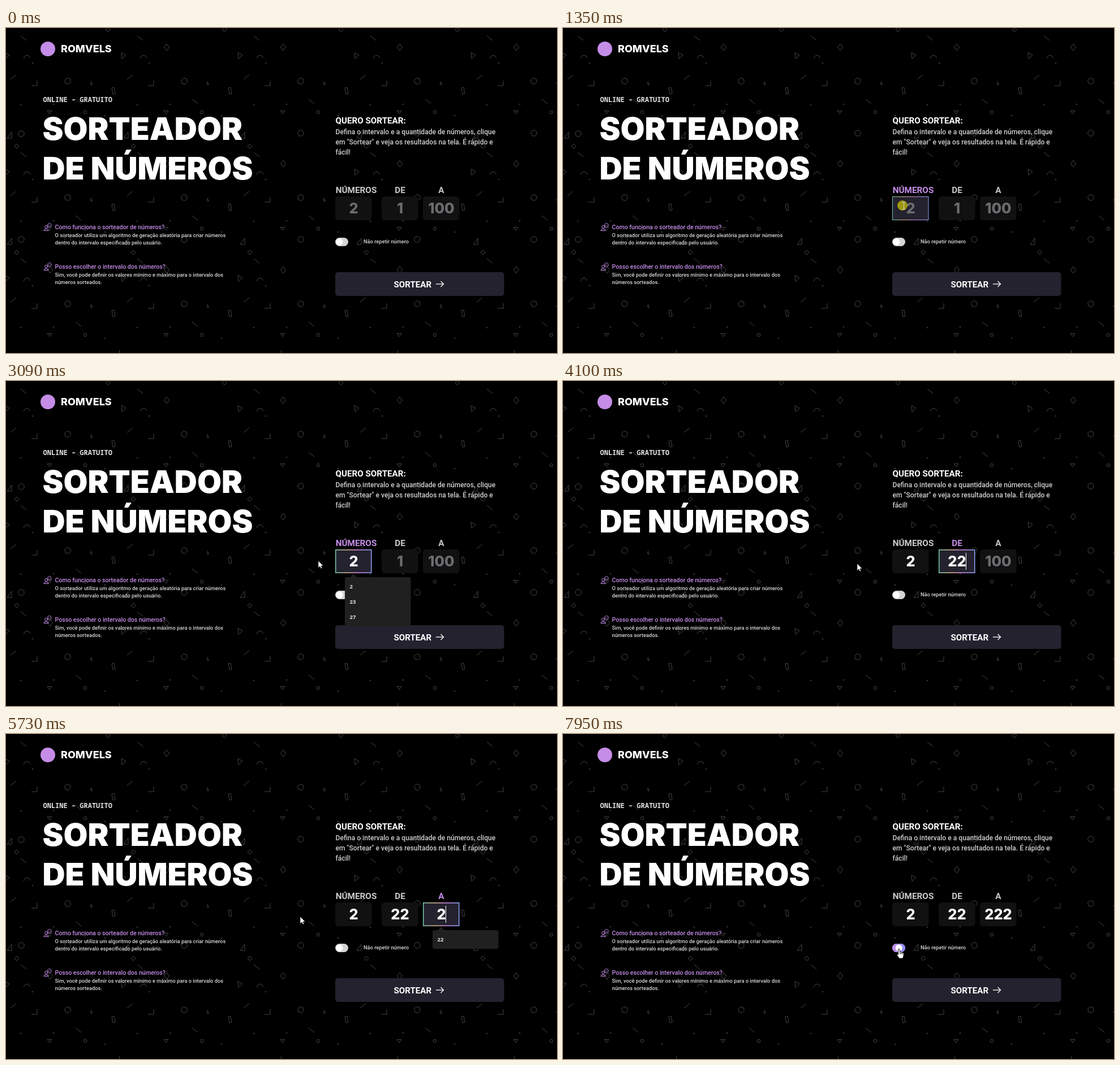
An HTML page with a canvas for the animation above (7.99 s loop, 974 by 575 pixels).

```html
<!DOCTYPE html>
<html lang="pt-BR">
<head>
<meta charset="utf-8">
<title>Sorteador de números</title>
<style>
  html, body { margin: 0; width: 100%; height: 100%; overflow: hidden; background: #000; }
  canvas { display: block; }
</style>
</head>
<body>
<canvas id="stage" width="974" height="575"></canvas>
<script>
const W = 974, H = 575, LOOP = 7990;
const ctx = document.getElementById('stage').getContext('2d');
const PURPLE = '#c58de7', PANEL = '#24222e', LIGHT = '#d0d0d2';
const ROBOTO = 'Roboto, sans-serif', INTER = 'Inter, sans-serif';

const clamp = v => Math.max(0, Math.min(1, v));
const easeOut = p => 1 - (1 - p) ** 2;
const easeInOut = p => p * p * (3 - 2 * p);

function text(c, str, x, y, font, color, align = 'left') {
  c.font = font;
  c.fillStyle = color;
  c.textAlign = align;
  c.fillText(str, x, y);
}

function box(c, x, y, w, h, r, fill) {
  c.beginPath();
  c.roundRect(x, y, w, h, r);
  c.fillStyle = fill;
  c.fill();
}

function disc(c, x, y, r, fill) {
  c.beginPath();
  c.arc(x, y, r, 0, Math.PI * 2);
  c.fillStyle = fill;
  c.fill();
}

function poly(c, points, closed = true) {
  c.beginPath();
  points.forEach(([x, y]) => c.lineTo(x, y));
  if (closed) c.closePath();
}

// ---- Confetti pattern ----
const SHAPES = {
  gem: c => poly(c, [[0, -4], [4, 0], [0, 4], [-4, 0]]),
  diamond: c => poly(c, [[0, -6], [4.5, 0], [0, 6], [-4.5, 0]]),
  play: c => poly(c, [[-3, -5.5], [5, -1], [-2, 5.5]]),
  wedge: c => poly(c, [[4, -6], [4, 5], [-4, 5]]),
  arc: c => { c.beginPath(); c.arc(0, 4, 5.5, Math.PI, Math.PI * 1.95); },
  slash: c => poly(c, [[-5, 4], [5, -4]], false),
  backslash: c => poly(c, [[-5, -4], [5, 4]], false),
  corner: c => poly(c, [[4, -5], [4, 4], [-6, 4]], false),
  bolt: c => poly(c, [[0, -4], [-2, 1], [1.5, 0], [-0.5, 4]], false),
  bar: c => poly(c, [[-3, -5], [1, -6], [3, 5], [-1, 6]]),
  hexagon: c => poly(c, [...Array(6)].map((_, i) =>
    [5.6 * Math.cos(i * Math.PI / 3 + 0.3), 5.6 * Math.sin(i * Math.PI / 3 + 0.3)])),
  tri: c => poly(c, [[-4, -2.5], [4, -2.5], [0, 3]]),
  ring: c => { c.beginPath(); c.arc(0, 0, 5.2, 0, 7); },
  ringlet: c => { c.beginPath(); c.arc(0, 0, 2.8, 0, 7); },
  dot: c => { c.beginPath(); c.arc(0, 0, 0.9, 0, 7); }
};
const TILE = [
  ['diamond', 78, 240], ['play', 1, 255], ['arc', 37, 256], ['backslash', 31, 224],
  ['dot', 47, 268], ['slash', 13, 293], ['hexagon', 109, 300], ['corner', 51, 304],
  ['bolt', 151, 304], ['bar', 190, 317], ['backslash', 128, 336], ['dot', 26, 342],
  ['dot', 84, 341], ['tri', 77, 355], ['ringlet', 140, 355], ['dot', 175, 361]
];
const LOW_ROW = [['ring', 109, 374], ['wedge', 6, 378]];

function stamp(c, name, x, y) {
  c.save();
  c.translate(x, y);
  SHAPES[name](c);
  c.stroke();
  c.restore();
}

function drawPattern(c) {
  c.strokeStyle = '#444447';
  c.lineWidth = 1;
  for (let x = -206; x <= W + 206; x += 206) {
    for (const [name, dx, y] of TILE) {
      for (const shift of [-206, 0, 188]) stamp(c, name, x + dx, y + shift);
    }
    for (const [name, dx, y] of LOW_ROW) {
      for (const shift of [-188, 0]) stamp(c, name, x + dx, y + shift);
    }
    stamp(c, 'gem', x + 180, 3);
    stamp(c, 'gem', x + 19, 209);
    stamp(c, 'gem', x + 19, 397);
  }
  stamp(c, 'ring', 27, 187);
  stamp(c, 'ring', 27, 374);
  for (const x of [200.5, 486.5, 692.5, 898.5]) {
    poly(c, [[x, 570], [x, 575]], false);
    c.stroke();
  }
}

// ---- Static page ----
function drawFaq(c, y, question, lines) {
  text(c, question, 86.5, y, `500 10.6px ${ROBOTO}`, PURPLE);
  lines.forEach((line, i) =>
    text(c, line, 86.5, y + 14 + 13.3 * i, `500 9.27px ${ROBOTO}`, '#d8d8da'));
  c.save();
  c.translate(66, y - 11);
  c.strokeStyle = PURPLE;
  c.lineWidth = 1;
  c.beginPath();
  c.arc(5, 7.4, 2.4, 0, 7);
  c.moveTo(0.8, 14);
  c.quadraticCurveTo(1.2, 11, 5, 11);
  c.quadraticCurveTo(8.8, 11, 9.2, 14);
  c.closePath();
  c.moveTo(7.6, 8);
  c.lineTo(8, 3.5);
  c.arc(10.8, 4.4, 3.3, Math.PI * 1.1, Math.PI * 2.75);
  c.closePath();
  c.stroke();
  for (const x of [9.3, 10.8, 12.3]) disc(c, x, 4.4, 0.5, PURPLE);
  c.restore();
}

function drawPage(c) {
  c.fillStyle = '#000';
  c.fillRect(0, 0, W, H);
  drawPattern(c);

  disc(c, 74, 37, 13, PURPLE);
  text(c, 'ROMVELS', 97, 43, `800 18px ${INTER}`, '#fff');
  text(c, 'ONLINE – GRATUITO', 65.5, 131, '600 12px "Noto Sans Mono", monospace', '#e3e3e5');
  text(c, 'SORTEADOR', 64.5, 198, `900 55.5px ${INTER}`, '#fff');
  text(c, 'DE NÚMEROS', 64.5, 268, `900 55.5px ${INTER}`, '#fff');

  drawFaq(c, 355.5, 'Como funciona o sorteador de números?', [
    'O sorteador utiliza um algoritmo de geração aleatória para criar números',
    'dentro do intervalo especificado pelo usuário.']);
  drawFaq(c, 425.5, 'Posso escolher o intervalo dos números?', [
    'Sim, você pode definir os valores mínimo e máximo para o intervalo dos',
    'números sorteados.']);

  text(c, 'QUERO SORTEAR:', 582.5, 169, `700 15.2px ${ROBOTO}`, '#fff');
  ['Defina o intervalo e a quantidade de números, clique',
   'em "Sortear" e veja os resultados na tela. É rápido e',
   'fácil!'].forEach((line, i) =>
    text(c, line, 582.5, 188 + 18 * i, `500 12.1px ${ROBOTO}`, LIGHT));

  text(c, 'Não repetir número', 632, 380.5, `500 9.25px ${ROBOTO}`, '#d8d8da');
  box(c, 582, 432, 298.5, 42, 5, PANEL);
  text(c, 'SORTEAR', 685.5, 458.5, `700 15.1px ${ROBOTO}`, '#fff');
  c.strokeStyle = '#fff';
  c.lineWidth = 1.3;
  poly(c, [[760, 453], [773.5, 453]], false);
  c.stroke();
  poly(c, [[768.5, 448], [773.5, 453], [768.5, 458]], false);
  c.stroke();
}

const page = document.createElement('canvas');
page.width = W;
page.height = H;

// ---- Form ----
const FIELDS = [
  { label: 'NÚMEROS', x: 582, labelX: 619, hint: '2', focus: [1390, 3320], keys: [[2220, '2']] },
  { label: 'DE', x: 664, labelX: 696.5, hint: '1', focus: [3320, 4480], keys: [[3940, '2'], [4100, '22']] },
  { label: 'A', x: 737, labelX: 769.5, hint: '100', focus: [4480, 7820],
    keys: [[5730, '2'], [5930, '22'], [6600, '222']] }
];

function drawField(f, t, hovered) {
  const focused = t >= f.focus[0] && t < f.focus[1];
  const active = focused || hovered;
  const typed = f.keys.filter(([at]) => t >= at).pop();
  const value = typed ? typed[1] : '';
  const mid = f.x + 32;

  text(ctx, f.label, f.labelX, 292, `700 15.3px ${ROBOTO}`, active ? PURPLE : '#c9c9cb', 'center');
  if (active) {
    const edge = focused ? 1.5 : 1;
    const g = ctx.createLinearGradient(f.x, 0, f.x + 64.5, 0);
    ['#74c9b2', '#dcbc8f', '#d98bea', '#8ba6fb'].forEach((color, i) =>
      g.addColorStop([0, 0.32, 0.62, 1][i], color));
    ctx.fillStyle = g;
    ctx.fillRect(f.x, 298, 64.5, 42);
    ctx.fillStyle = PANEL;
    ctx.fillRect(f.x + edge, 298 + edge, 64.5 - 2 * edge, 42 - 2 * edge);
  } else {
    box(ctx, f.x, 298, 64.5, 42, 5, '#111112');
  }
  text(ctx, value || f.hint, mid + 0.5, 327.5, `800 25.4px ${INTER}`, value ? '#fff' : '#6c6c70', 'center');

  const since = t - Math.max(f.focus[0], typed ? typed[0] : 0);
  if (focused && since % 1000 < 500) {
    const half = value ? ctx.measureText(value).width / 2 : 0;
    ctx.fillStyle = '#fff';
    ctx.fillRect(Math.round(mid + half), 304, 1, 30);
  }
}

function drawList(x, tip, items) {
  const fill = '#202020';
  poly(ctx, [[tip - 6, 347.5], [tip, 341], [tip + 6, 347.5]]);
  ctx.fillStyle = fill;
  ctx.fill();
  box(ctx, x, 347, 116.5, 6 + 27 * items.length, 4, fill);
  items.forEach((item, i) =>
    text(ctx, item, x + 8.5, 367 + 27 * i, '700 9.5px "Open Sans", sans-serif', '#e6e6e6'));
}

function drawToggle(t) {
  const p = easeInOut(clamp((t - 7905) / 90));
  box(ctx, 582, 371, 23, 15, 7.5, '#d4d4d4');
  if (p > 0) {
    const g = ctx.createLinearGradient(582, 0, 605, 0);
    g.addColorStop(0, PURPLE);
    g.addColorStop(1, '#8b8cff');
    ctx.globalAlpha = clamp(p * 2);
    box(ctx, 582, 371, 23, 15, 7.5, g);
    ctx.globalAlpha = 1;
  }
  disc(ctx, 589.5 + 8 * p, 378.5, 6, '#fff');
}

// ---- Pointer ----
const MOVES = [
  { at: [20, 810], from: [884, 578], via: [760, 440], to: [602, 314] },
  { at: [2830, 3530], from: [602, 314], via: [560, 316], to: [520, 323] },
  { at: [7020, 7780], from: [520, 323], via: [557, 338], to: [594, 380] }
];

function pointerAt(t) {
  const move = MOVES.filter(m => t >= m.at[0]).pop();
  if (!move) return null;
  const p = easeOut(clamp((t - move.at[0]) / (move.at[1] - move.at[0])));
  return [0, 1].map(k =>
    (1 - p) ** 2 * move.from[k] + 2 * p * (1 - p) * move.via[k] + p * p * move.to[k]);
}

const inside = (p, x, y, w, h) => p && p[0] >= x && p[0] < x + w && p[1] >= y && p[1] < y + h;

const ARROW = [[0, 0], [0, 12.5], [2.9, 9.8], [4.8, 14], [6.8, 13.1], [5, 9], [8.8, 9]];

function drawHand() {
  ctx.beginPath();
  ctx.moveTo(-1.4, 1);
  ctx.quadraticCurveTo(0, -1, 1.4, 1);
  ctx.lineTo(1.4, 5.5);
  ctx.quadraticCurveTo(3, 4.8, 4, 6);
  ctx.quadraticCurveTo(5.6, 5.6, 6.3, 7);
  ctx.quadraticCurveTo(8.2, 6.8, 8.2, 8.5);
  ctx.lineTo(8, 13);
  ctx.lineTo(6.7, 17);
  ctx.lineTo(0.4, 17);
  ctx.lineTo(-3.8, 11);
  ctx.quadraticCurveTo(-4, 8.5, -1.4, 10.5);
  ctx.closePath();
  ctx.fillStyle = '#fff';
  ctx.fill();
  ctx.strokeStyle = '#000';
  ctx.lineWidth = 0.9;
  ctx.stroke();
  for (const x of [1.6, 3.7, 5.8]) {
    poly(ctx, [[x, 6.5], [x, 9.5]], false);
    ctx.stroke();
  }
}

function drawPointer(p) {
  ctx.save();
  ctx.translate(Math.round(p[0]), Math.round(p[1]));
  if (FIELDS.some(f => inside(p, f.x, 298, 64, 42))) {
    ctx.strokeStyle = '#c9c9c9';
    ctx.lineWidth = 1;
    poly(ctx, [[-3, -5.5], [3, -5.5]], false);
    ctx.stroke();
    poly(ctx, [[-3, 6.5], [3, 6.5]], false);
    ctx.stroke();
    poly(ctx, [[0.5, -5.5], [0.5, 6.5]], false);
    ctx.stroke();
  } else if (inside(p, 582, 371, 23, 15) || inside(p, 582, 432, 298, 42)) {
    drawHand();
  } else {
    poly(ctx, ARROW);
    ctx.fillStyle = '#fff';
    ctx.fill();
    ctx.strokeStyle = '#000';
    ctx.lineWidth = 0.6;
    ctx.stroke();
  }
  ctx.restore();
}

function draw(t) {
  const pointer = pointerAt(t);
  ctx.drawImage(page, 0, 0);
  for (const f of FIELDS) drawField(f, t, inside(pointer, f.x, 298, 64, 42));
  drawToggle(t);

  if (t >= 1470 && t < 2220) drawList(599, 614, ['2', '23', '27', '5', '10', '50']);
  else if (t >= 2220 && t < 3320) drawList(599, 614, ['2', '23', '27']);
  if (t >= 5730 && t < 6070) {
    ctx.globalAlpha = 1 - clamp((t - 5930) / 140);
    drawList(754, 769, ['22']);
    ctx.globalAlpha = 1;
  }

  const pressed = (t >= 1350 && t < 1470) || (t >= 7820 && t < 7905);
  if (pressed) disc(ctx, pointer[0] - 2, pointer[1], 9, 'rgba(178, 172, 8, 0.85)');
  if (pointer) drawPointer(pointer);
}

drawPage(page.getContext('2d'));
const start = performance.now();
function tick() {
  draw((performance.now() - start) % LOOP);
  requestAnimationFrame(tick);
}
tick();
</script>
</body>
</html>
```
